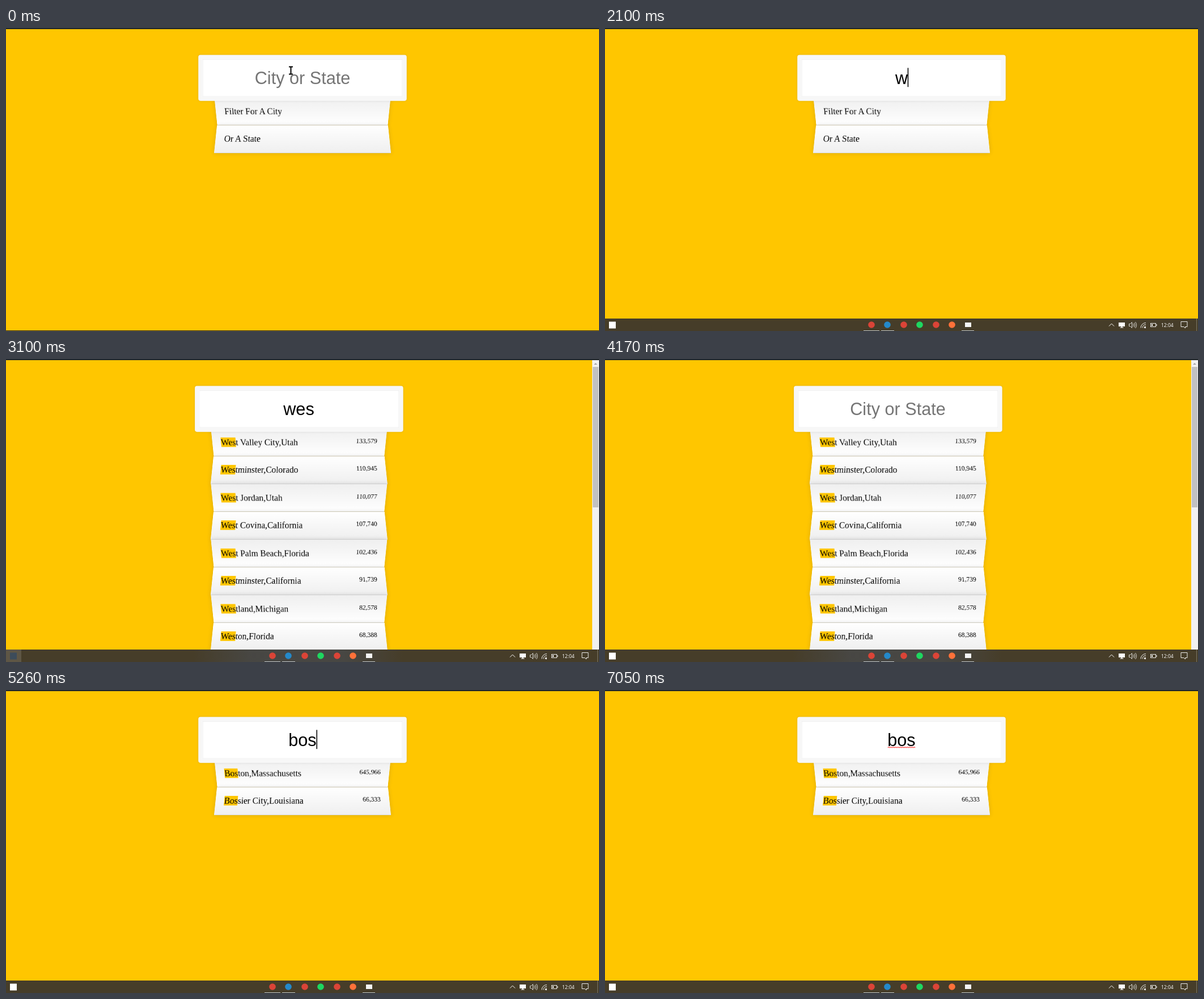
Animation of 1046x535 px, one loop 7280 ms. Source, as an HTML page:

```html
<!DOCTYPE html>
<html lang="en">
<head>
<meta charset="utf-8">
<title>Type ahead</title>
<style>
html, body { margin: 0; width: 100%; height: 100%; overflow: hidden; background: #ffc600; }
#stage { position: absolute; left: 0; top: 0; width: 1046px; height: 535px; overflow: hidden; background: #ffc600; }
#page {
  position: absolute; left: 0; top: 0; width: 1366px; height: 699px; overflow: hidden;
  transform: scale(.76574); transform-origin: 0 0;
  font: 20px/23px "Liberation Serif", serif; color: #000;
}
#form { position: absolute; top: 0; width: 400px; }
#search {
  position: absolute; z-index: 2; left: -40px; top: 62px; width: 480px; height: 106px;
  box-sizing: border-box; padding: 20px; border: 10px solid #f7f7f7; border-radius: 5px;
  background: #fff; text-align: center; white-space: pre;
  font: 40px/46px "Liberation Sans", Arial, sans-serif;
  box-shadow: 0 0 5px rgba(0,0,0,.12), inset 0 0 2px rgba(0,0,0,.19);
}
#word { position: relative; display: inline-block; height: 46px; }
#word.empty { color: #757575; }
#word.picked { background: #3297fd; color: #fff; height: 44px; }
#caret { position: absolute; left: 100%; top: 0; width: 1.31px; height: 44px; background: #000; }
.empty #caret { left: 50%; }
#squiggle { position: absolute; left: 0; top: 38px; width: 64px; height: 5px; overflow: hidden; }
#list { position: absolute; left: 0; top: 158px; margin: 0; padding: 0; width: 400px; list-style: none; }
#list li {
  box-sizing: border-box; height: 64px; padding: 20px; border-bottom: 1px solid #d8d8d8;
  box-shadow: 0 0 10px rgba(0,0,0,.14); display: flex; justify-content: space-between; white-space: pre;
}
#list li:nth-child(odd) {
  transform: perspective(100px) rotateX(-3deg) translateY(3px);
  background: linear-gradient(to top, #fff, #efefef);
}
#list li:nth-child(even) {
  transform: perspective(100px) rotateX(3deg) translateY(2px) scale(1.001);
  background: linear-gradient(to bottom, #fff, #efefef);
}
#list b { font-weight: normal; background: #ffc600; }
#list small { font-size: 15px; line-height: 17px; }
#strip { position: absolute; left: 0; top: 0; width: 1046px; height: 1.5px; background: #20262a; }
#edge { position: absolute; left: 0; top: 534px; width: 1046px; height: 1px; background: #2c2616; }
#scroll { position: absolute; left: 1034px; top: 1.5px; width: 12px; height: 534px; background: #f1f1f1; }
#thumb { position: absolute; left: 1px; top: 12.5px; width: 10px; background: #c1c1c1; }
#bar { position: absolute; left: 0; top: 513px; width: 1046px; height: 22px; background: #463d29; }
#sheen {
  position: absolute; left: 330px; top: 0; width: 370px; height: 22px;
  background: linear-gradient(90deg, transparent, rgba(72,74,76,.75) 28%, rgba(72,74,76,.75) 72%, transparent);
}
#hover { position: absolute; left: 0; top: 0; width: 27px; height: 22px; background: rgba(255,255,255,.13); }
#glow { position: absolute; left: 0; top: 0; width: 84px; height: 22px; background: linear-gradient(90deg, rgba(255,255,255,.13), transparent); }
#bar svg, #cursor { position: absolute; left: 0; top: 0; }
#tip {
  position: absolute; left: 0; top: 497px; width: 28px; height: 15px; box-sizing: border-box;
  background: #2b2b2b; border: 1px solid #6a6a6a; color: #fff; text-align: center;
  font: 8.5px/13px "Open Sans", sans-serif;
}
</style>
</head>
<body>
<div id="stage">
  <div id="page">
    <div id="form">
      <div id="search"><span id="word"><span id="text"></span><i id="caret"></i><svg id="squiggle"><path fill="none" stroke="#f00" stroke-width="1.2"/></svg></span></div>
      <ul id="list"></ul>
    </div>
  </div>
  <div id="scroll">
    <svg width="12" height="12" style="display:block"><path d="M3 8 6 5 9 8z" fill="#a3a3a3"/></svg>
    <div id="thumb"></div>
  </div>
  <div id="strip"></div>
  <div id="edge"></div>
  <div id="bar">
    <div id="sheen"></div><div id="glow"></div><div id="hover"></div>
    <svg width="1046" height="22">
      <rect id="start" x="7" y="5.5" width="12" height="12"/>
      <g id="apps"></g>
      <rect x="635" y="7" width="11" height="8" fill="#f4f4f4"/>
      <g fill="#c3c9cc">
        <rect x="456" y="21" width="28" height="1"/><rect x="487" y="21" width="23" height="1"/><rect x="629" y="21" width="22" height="1"/>
      </g>
      <g fill="none" stroke="#fff">
        <path d="M889 13.5l4.5-4.5 4.5 4.5"/>
        <path d="M924.5 9.5h2l3-3v10l-3-3h-2zM931.5 9q2 2.500 0 5M933.500 7.500q3 4 0 8M935.500 6q4 5.500 0 11" stroke-width=".8"/>
        <path d="M945 16.500a9 9 0 0 1 9-9M948 16.500a6 6 0 0 1 6-6M951 16.500a3 3 0 0 1 3-3" stroke-width=".9"/>
        <rect x="962.500" y="8.500" width="9" height="6" stroke-width=".9"/>
        <path d="M1016 5.500h11v9h-3.500v2.500l-2.500-2.500h-5z" stroke-width=".9"/>
        <path d="M1043.500 0v22" stroke="#8a8474" stroke-width=".8"/>
      </g>
      <path d="M906 7h11v7h-4.500v1.500h2v1h-6v-1h2v-1.500H906zM964 10h2v3h-2zM972.500 10h1v3h-1zM951.500 15h2.500v2h-2.500z" fill="#fff"/>
      <text x="981" y="14.500" fill="#fff" font-size="8.5" font-family="Open Sans, Noto Sans, sans-serif">12:04</text>
    </svg>
  </div>
  <div id="tip">Start</div>
  <svg id="cursor" width="14" height="18" overflow="visible">
    <path id="beam" d="M-3.500-6.500H3.500M-3.500 6.500H3.500M0-6.500V6.500" stroke="#000" stroke-width="2" fill="none"/>
    <path id="arrow" d="M0 0V13l3-2.800 2 4.600 2-.9-2-4.500h4.200z" fill="#fff" stroke="#000" stroke-width=".8"/>
  </svg>
</div>
<script>
const LOOP = 7280;
const $ = id => document.getElementById(id);
const show = (id, on) => { $(id).style.display = on ? '' : 'none'; };

// Each list: highlighted letters, scrollbar thumb height, rows.
const lists = {
  hint: { rows: ['Filter For A City', 'Or A State'] },
  w: { hit: 'w', thumb: 23.5, rows: [
    'New York,New York|8,405,837', 'Fort Worth,Texas|792,727', 'Seattle,Washington|652,405',
    'Washington,District Of Columbia|646,449', 'Milwaukee,Wisconsin|599,164',
    'Albuquerque,New Mexico|556,495', 'Wichita,Kansas|386,552', 'New Orleans,Louisiana|378,715'] },
  wes: { hit: 'wes', thumb: 248, rows: [
    'West Valley City,Utah|133,579', 'Westminster,Colorado|110,945', 'West Jordan,Utah|110,077',
    'West Covina,California|107,740', 'West Palm Beach,Florida|102,436',
    'Westminster,California|91,739', 'Westland,Michigan|82,578', 'Weston,Florida|68,388'] },
  bos: { hit: 'bos', rows: ['Boston,Massachusetts|645,966', 'Bossier City,Louisiana|66,333'] }
};
const wes = lists.wes.rows;
lists.we = { hit: 'we', thumb: 160,
  rows: [...wes.slice(0, 3), 'Lowell,Massachusetts|108,861', ...wes.slice(3, 7)] };

// Step tracks: [start time, value]
const tracks = {
  list: [[0, 'hint'], [2280, 'w'], [2530, 'we'], [2780, 'wes'], [5260, 'bos']],
  text: [[0, ''], [2030, 'w'], [2350, 'we'], [2600, 'wes'], [4100, ''], [5190, 'bos']],
  caret: [[0, 0], [460, 1], [970, 0], [1420, 1], [2030, 0], [2100, 1], [3100, 0],
    [4100, 1], [4170, 0], [5190, 1], [5750, 0], [6270, 1], [6720, 0]],
  picked: [[0, 0], [3460, 1], [4100, 0]],
  squiggle: [[0, 0], [6720, 1]],
  drop: [[0, 22], [1420, 16], [1500, 9], [1590, 3], [1670, 0]],
  hover: [[0, 0], [3030, 1], [3590, .5], [3660, 0], [5950, .3], [6010, .6], [6070, 1], [7050, 0]],
  glow: [[0, 0], [5950, .5], [6010, .3], [6070, 0]],
  tip: [[0, 0], [6720, .5], [6790, 1], [7050, 0]],
  mouse: [[0, [502.5, 75]], [390, [497, 72]], [460, [500, 74]], [710, [490, 108]], [775, [472, 190]],
    [840, [450, 290]], [905, [431, 390]], [970, [423, 464]], [1420, [416, 512]], [1500, null]]
};
const at = (name, t) => tracks[name].reduce((v, [start, next]) => t >= start ? next : v, null);

function fillList(name) {
  const { hit, thumb, rows } = lists[name];
  const mark = s => hit ? s.replace(new RegExp(hit, 'gi'), '<b>$&</b>') : s;
  $('list').innerHTML = rows.map(row => {
    const [place, count = ''] = row.split('|');
    return `<li><span>${mark(place)}</span><small>${count}</small></li>`;
  }).join('');
  show('scroll', thumb);
  show('sheen', thumb);
  $('thumb').style.height = (thumb || 0) + 'px';
  $('form').style.left = (thumb ? 1349 : 1366) / 2 - 200 + 'px';
}

function setup() {
  const apps = [[470, '#db4437'], [498, '#2489ca'], [527, '#db4437'], [555, '#1ed760'], [584, '#db4437'], [612, '#ff7139']];
  $('apps').innerHTML = apps.map(([x, c]) => `<circle cx="${x}" cy="11" r="5.8" fill="${c}"/>`).join('');
  let d = 'M0 3.5';
  for (let i = 1; i < 33; i++) d += `L${i * 2} ${i % 2 ? 1 : 3.5}`;
  $('squiggle').firstChild.setAttribute('d', d);
}

let shownList;
function draw(t) {
  const list = at('list', t), text = at('text', t), mouse = at('mouse', t), hover = at('hover', t), drop = at('drop', t);
  if (list !== shownList) fillList(shownList = list);

  $('text').textContent = text || 'City or State';
  $('word').className = text ? (at('picked', t) ? 'picked' : '') : 'empty';
  show('caret', at('caret', t));
  show('squiggle', at('squiggle', t));

  show('bar', drop < 22);
  $('bar').style.transform = `translateY(${drop}px)`;
  $('hover').style.opacity = hover;
  $('glow').style.opacity = at('glow', t);
  $('start').style.fill = hover === 1 ? '#3d4c5a' : hover ? '#a9b4bd' : '#fff';
  $('tip').style.opacity = at('tip', t);

  show('cursor', mouse);
  if (mouse) {
    $('cursor').style.transform = `translate(${mouse[0]}px, ${mouse[1]}px)`;
    show('beam', mouse[1] < 128);
    show('arrow', mouse[1] >= 128);
  }
}

function frame() {
  draw(performance.now() % LOOP);
  requestAnimationFrame(frame);
}
setup();
frame();
</script>
</body>
</html>
```
